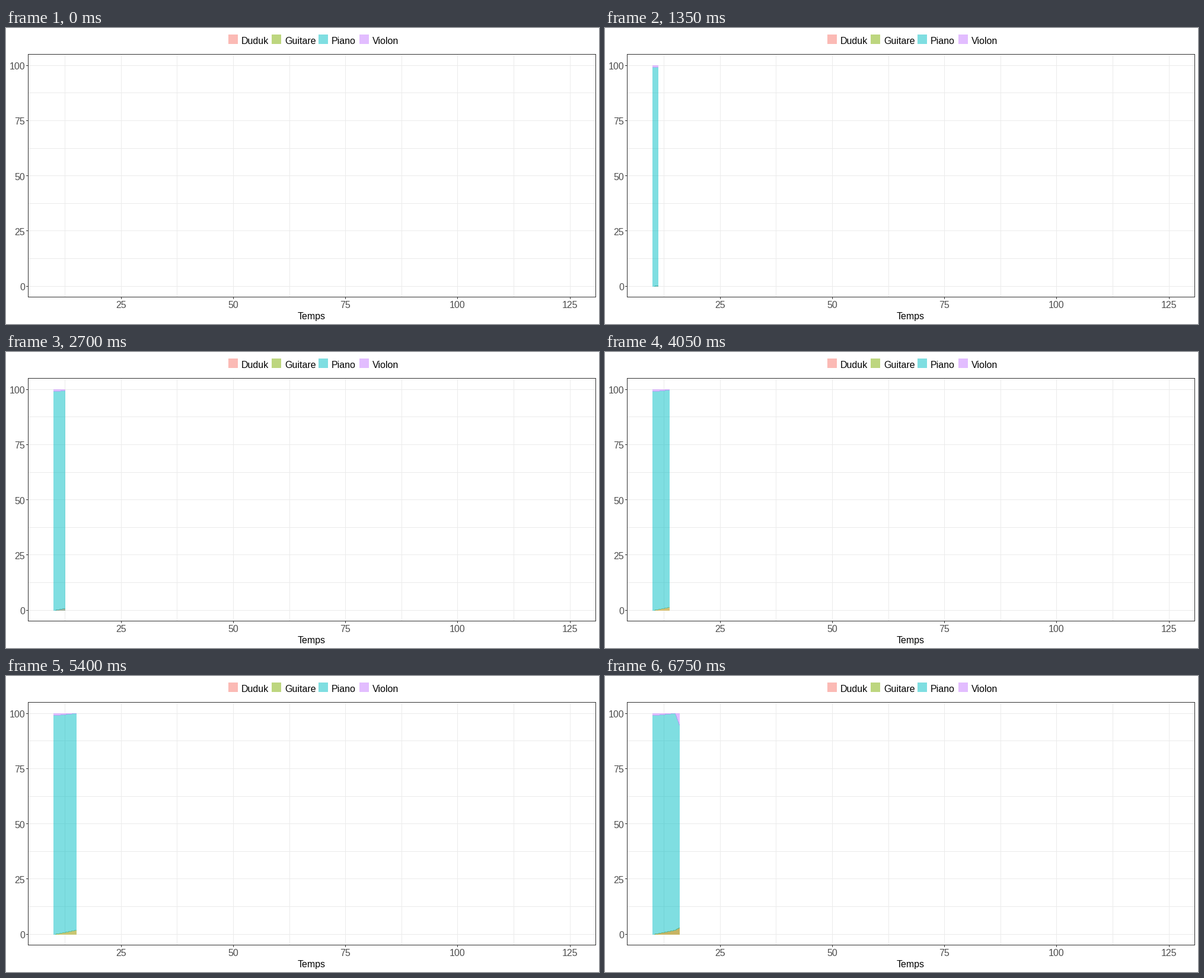
Write a matplotlib script that moves like this. It is 1000x500 px and loops after 8000 ms.

```python
import numpy as np
import matplotlib.pyplot as plt
from matplotlib.animation import FuncAnimation
from matplotlib.patches import Polygon, Rectangle

W, H, DPI = 1000, 500, 100
LOOP, INTERVAL, HOLD = 8000, 50, 1350

PINK, GREEN, CYAN, VIOLET = "#F8766D", "#7CAE00", "#00BFC4", "#C77CFF"
GRID, DARK, LABEL = "#EBEBEB", "#333333", "#4D4D4D"

# Reveal position after each step, and the tone of the thin bottom layer
REVEAL = [10, 11.25, 12.5, 13.75, 15, 16]
BASE_TONES = ["#BDD67F", "#8FB9B0", "#A3B3A0", "#D6BF74", "#C8C672", "#C8B463"]

# Layer boundaries, in percent
TIMES = [10, 10.4, 12.5, 15, 16]
BASE_TOP = [0, 0, 0.8, 1.8, 3.0]
PIANO_TOP = [99, 99, 99.45, 100, 94.5]

plt.rcParams["font.family"] = "Liberation Sans"
fig = plt.figure(figsize=(W / DPI, H / DPI), dpi=DPI, facecolor="white")
ax = fig.add_axes([0, 0, 1, 1])
ax.set_xlim(0, W)
ax.set_ylim(H, 0)
ax.axis("off")


def px(t):
    return 4.75 + 7.571 * np.asarray(t)


def py(v):
    return 436.2 - 3.73 * np.asarray(v)


def box(x, y, w, h, color, alpha=1, z=1):
    ax.add_patch(Rectangle((x, y), w, h, fc=color, lw=0, alpha=alpha,
                           antialiased=False, zorder=z))


def label(x, y, text, color="black", ha="center"):
    ax.text(x, y, text, color=color, ha=ha, va="baseline",
            fontsize=16 * 72 / DPI, zorder=6)


def area(color, alpha=0.5):
    shape = Polygon([(0, 0)] * 3, closed=True, fc=color, lw=0, alpha=alpha,
                    antialiased=False, zorder=3)
    return ax.add_patch(shape)


def draw_grid():
    for t in np.arange(12.5, 126, 12.5):
        x = int(px(t) + 0.1)
        box(x, 45, 1, 409, GRID)
        if t % 25 == 0:
            box(x, 455, 1, 3, DARK)
            label(x, 473, f"{t:.0f}", LABEL)
    for v in np.arange(0, 101, 12.5):
        y = int(py(v))
        box(38, y, 956, 1, GRID)
        if v % 25 == 0:
            box(34, y, 3, 1, DARK)
            label(32, round(float(py(v)) + 7), f"{v:.0f}", LABEL, "right")


def draw_frame():
    for y in (44, 454):
        box(37, y, 958, 1, DARK, z=5)
    for x in (37, 994):
        box(x, 44, 1, 411, DARK, z=5)


def draw_legend():
    keys = [(375, "Duduk", PINK), (448, "Guitare", GREEN),
            (527, "Piano", CYAN), (596, "Violon", VIOLET)]
    for x, name, color in keys:
        box(x, 11, 16, 16, color, 0.5)
        label(x + 22, 27, name, ha="left")


draw_grid()
draw_frame()
draw_legend()
label(515, 492, "Temps")
base, piano, violin = area(BASE_TONES[0], 1), area(CYAN), area(VIOLET)


def band(shape, t, low, high):
    x = px(t)
    shape.set_xy(np.vstack([np.column_stack([x, py(low)]),
                            np.column_stack([x, py(high)])[::-1]]))


def update(i):
    step = min(i * INTERVAL // HOLD, len(REVEAL) - 1)
    end = REVEAL[step]
    t = np.array([p for p in TIMES if p < end] + [end])
    low = np.interp(t, TIMES, BASE_TOP)
    high = np.interp(t, TIMES, PIANO_TOP)
    band(base, t, 0 * t, low)
    band(piano, t, low, high)
    band(violin, t, high, 0 * t + 100)
    base.set_facecolor(BASE_TONES[step])
    for shape in (base, piano, violin):
        shape.set_visible(step > 0)
    return base, piano, violin


anim = FuncAnimation(fig, update, frames=LOOP // INTERVAL, interval=INTERVAL,
                     repeat=True, repeat_delay=0, blit=False)
plt.show()
```
